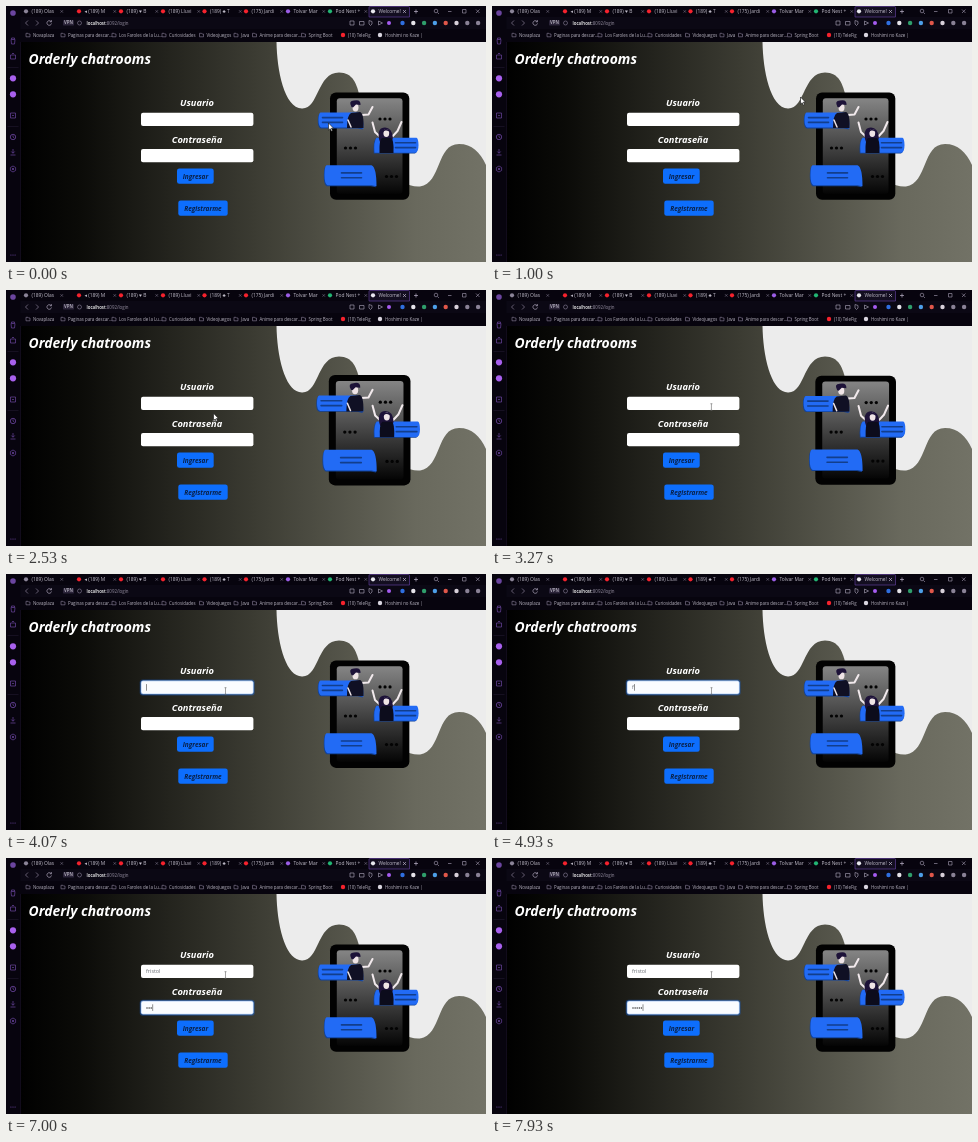
Write an HTML page that moves like this. It is 480x256 px and loops after 8000 ms.

```html
<!DOCTYPE html>
<html lang="es">
<head>
<meta charset="utf-8">
<title>Welcome!</title>
<style>
html, body { margin: 0; width: 100%; height: 100%; overflow: hidden; background: #000; }
svg { display: block; width: 100vw; height: 100vh; }
text { font-family: "Open Sans", "Noto Sans", sans-serif; white-space: pre; }
.ui { font-size: 4.9px; fill: #c4c0cd; }
.mark { font-size: 4.4px; fill: #b9b5c2; }
.head { font-weight: 700; font-style: italic; fill: #fff; }
.btn { font-weight: 700; font-style: italic; font-size: 6.5px; fill: #0a2148; }
.value { font-size: 5.4px; fill: #686c72; }
</style>
</head>
<body>
<svg viewBox="0 0 480 256" preserveAspectRatio="none">
  <defs>
    <linearGradient id="page">
      <stop offset="0" stop-color="#000"/>
      <stop offset=".13" stop-color="#0b0b08"/>
      <stop offset=".5" stop-color="#3b3b32"/>
      <stop offset=".85" stop-color="#69695d"/>
      <stop offset="1" stop-color="#727266"/>
    </linearGradient>
    <linearGradient id="screen" x2="0" y2="1">
      <stop offset="0" stop-color="#858585"/>
      <stop offset=".55" stop-color="#3e3e3e"/>
      <stop offset="1" stop-color="#050505"/>
    </linearGradient>
  </defs>

  <rect x="14" y="35" width="466" height="221" fill="url(#page)"/>
  <path fill="#ececec" d="M270.500 36C271 64 278 102 296 102.500C313 103 311 66.500 333 66.500C347 66.500 351 78 354 92C360 125 372 168 396 175C402 179 408 181 414 180.500C436 177 430 138 453 138C466 138 474 146 480 159V36Z"/>

  <path d="M0 0H480V36H14.500V256H0Z" fill="#07040e"/>
  <path d="M14.500 11H480V23H14.500Z" fill="#0b0814"/>
  <path d="M14.500 256V36" stroke="#1b142b" stroke-width=".6"/>
  <path d="M363 11V1.500Q363 .5 364 .5H402.500Q403.500 .5 403.500 1.500V11Z" fill="#130e20" stroke="#6a45a8" stroke-width=".6"/>
  <g id="side" fill="none" stroke="#6b459f" stroke-width=".8"></g>
  <g id="bar"></g>

  <text class="head" x="22.500" y="58" font-size="13.900">Orderly chatrooms</text>
  <text class="head" x="191" y="100.300" font-size="9.300" text-anchor="middle">Usuario</text>
  <text class="head" x="191" y="136.700" font-size="9.300" text-anchor="middle">Contraseña</text>
  <g id="form"></g>
  <rect x="171" y="162.500" width="36.700" height="15.200" rx="2.300" fill="#0d6efd"/>
  <text class="btn" x="189.500" y="172.500" text-anchor="middle">Ingresar</text>
  <rect x="172.300" y="194.500" width="49.400" height="15.300" rx="2.300" fill="#0d6efd"/>
  <text class="btn" x="197" y="204.600" text-anchor="middle">Registrarme</text>

  <g id="art">
    <rect x="324" y="86.600" width="79.300" height="107.200" rx="6" fill="#020202"/>
    <rect x="330.800" y="92.300" width="65.700" height="95.500" rx="3" fill="url(#screen)"/>
    <g id="bubbles"></g>
    <g stroke-linecap="round" stroke-linejoin="round">
      <path d="M356 109L362.500 108.500L366.500 101" fill="none" stroke="#f1e9ec" stroke-width="2"/>
      <path d="M341 122Q341 109 345 107L354 106Q358 107 357.500 122Z" fill="#101024"/>
      <path d="M342 114L345 121" stroke="#eee5e8" stroke-width="1.500"/>
      <ellipse cx="349.500" cy="101.500" rx="3" ry="3.900" fill="#efe4e6"/>
      <path d="M345.500 101Q342 94.500 348 94.500Q355 93 354.500 99L350 98.500L347 101.500Z" fill="#1d1238"/>
      <path d="M375.500 132L369 126L366.500 116.500M385 132L391.500 125L395.500 116" fill="none" stroke="#f1e9ec" stroke-width="2"/>
      <path d="M373 133Q371 121.500 379 121.500Q386 121.500 387 132L385 136H374Z" fill="#1d1238"/>
      <ellipse cx="380.300" cy="127" rx="2.900" ry="3.900" fill="#efe4e6"/>
      <path d="M376.500 126Q379 122 383.500 125" fill="none" stroke="#1d1238" stroke-width="1.500"/>
      <path d="M373.500 147Q373 134 376 132L385 132Q388 133 387.500 147Z" fill="#0c0c1c"/>
    </g>
  </g>

  <g id="cursor">
    <path id="arrow" d="M0 0V7.200L1.700 5.700L2.800 8.200L4 7.600L2.900 5.200H5Z" fill="#fff" stroke="#111" stroke-width=".6"/>
    <path id="beam" d="M-1 -3.300H1M0 -3.300V3.300M-1 3.300H1" fill="none" stroke="#666" stroke-width=".6"/>
  </g>
</svg>
<script>
const LOOP = 8000, PULSE = 1000;
const NS = "http://www.w3.org/2000/svg";
const $ = id => document.getElementById(id);

function add(parent, tag, attrs, text) {
  const el = document.createElementNS(NS, tag);
  for (const k in attrs) el.setAttribute(k, attrs[k]);
  if (text) el.textContent = text;
  parent.appendChild(el);
  return el;
}
const dot = (g, cx, cy, r, fill) => add(g, "circle", { cx, cy, r, fill, stroke: "none" });
const label = (g, x, y, cls, text) => add(g, "text", { x, y, class: cls }, text);
const line = (g, d, stroke, w = .7) => add(g, "path", { d, stroke, fill: "none", "stroke-width": w });

function drawTabs(g) {
  const red = "#f5222d";
  [[20, "#8b8498", "(189) Olas"], [73, red, "◂ (189) M"], [115, red, "(189) ♥ B"],
   [157, red, "(189) Lluvi"], [198.5, red, "(189) ♣ T"], [240, red, "(175) Jardi"],
   [282, "#9b5de5", "Tolvar Mar"], [324, "#22b573", "Pod Nest +"], [367, "#e8e8ee", "Welcome!"]
  ].forEach(([x, fill, name], i) => {
    dot(g, x, 5.3, 2.1, fill);
    label(g, x + 5.5, 7, "ui", name);
    if (i < 8) line(g, `M${x + 34.5} 4.200L${x + 37} 6.700M${x + 37} 4.200L${x + 34.5} 6.700`, "#8d859b", .5);
  });
  line(g, "M397 4L400 7M400 4L397 7M408 5.500H412M410 3.500V7.500", "#bcb4c9");
  line(g, "M431.500 6.500L433 8M442 5.500H445.500M456.500 3.500H460V7H456.500ZM470 3.500L473.500 7M473.500 3.500L470 7", "#aaa2b8", .6);
  add(g, "circle", { cx: 430, cy: 5, r: 1.8, fill: "none", stroke: "#aaa2b8", "stroke-width": .6 });
}

function drawAddress(g) {
  line(g, "M22 14.500L19.500 17L22 19.500M30 14.500L32.500 17L30 19.500", "#8b829a");
  line(g, "M45 15.500A2.300 2.300 0 1 0 45.500 17.500M45.500 14.200V15.800H43.800", "#b3abc0");
  add(g, "rect", { x: 57, y: 14, width: 11, height: 5.6, rx: 1.2, fill: "#2b2439" });
  label(g, 58, 18.3, "mark", "VPN").setAttribute("font-weight", 600);
  add(g, "circle", { cx: 73.5, cy: 17, r: 2, fill: "none", stroke: "#8b829a", "stroke-width": .6 });
  const url = label(g, 80.5, 18.6, "mark", "");
  add(url, "tspan", { fill: "#fff", "font-weight": 600 }, "localhost");
  add(url, "tspan", { fill: "#9992a5" }, ":8092/login");
  line(g, "M344 15H348V19H344ZM353.500 15.500H358V19H353.500ZM363 14.500L366 15.500V18L364.500 19.500L363 18ZM372.500 15L376.500 17L372.500 19Z", "#b3abc0", .6);
  dot(g, 383, 17, 2, "#a65cf0");
  ["#2f6fe0", "#e6e4ea", "#2f9e6b", "#4d9fe8", "#e0574a", "#d8d0da", "#8a8296", "#8a8296"]
    .forEach((c, i) => dot(g, 396.5 + i * 10.8, 17, 2.2, c));
}

function drawBookmarks(g) {
  [[22, "Novaplaza"], [57, "Paginas para descar..."], [108, "Los Faroles de la Lu..."],
   [158, "Curiosidades"], [195.5, "Videojuegos"], [230, "Java"],
   [248.5, "Anime para descar..."], [297.5, "Spring Boot"], [337, "(10) TeleFig", "#f5222d"],
   [374, "Hoshimi no Kaze |", "#d9d5df"]
  ].forEach(([x, name, color]) => {
    if (color) dot(g, x, 29, 2.2, color);
    else line(g, `M${x - 2} 27.300H${x}L${x + .6} 28H${x + 2}V30.800H${x - 2}Z`, "#8b829a", .6);
    label(g, x + 5, 30.6, "mark", name);
  });
}

function drawSide(g) {
  const purple = "#6b459f";
  dot(g, 7, 7, 2.8, purple);
  dot(g, 7, 72.3, 3.1, "#a860ee");
  dot(g, 7, 88.3, 3.1, "#a860ee");
  line(g, "M5 33.500H9L8.500 38H5.500ZM5.500 33V32H8.500V33", purple);
  line(g, "M4.500 49H9.500V53H4.500ZM6 47.500H8", purple);
  line(g, "M1.500 61.500H12.500M1.500 120.500H12.500", "#251c35", .5);
  line(g, "M4.500 107H9.500V112H4.500ZM6 109.500H8", purple);
  add(g, "circle", { cx: 7, cy: 131, r: 2.7 });
  line(g, "M7 129.300V131L8.300 132", purple);
  line(g, "M7 143V147M5.300 145.500L7 147.300L8.700 145.500M4.500 149H9.500", purple);
  line(g, "M7 160L9.600 161.500V164.500L7 166L4.400 164.500V161.500Z", purple);
  dot(g, 7, 163, 1, purple);
  for (let i = -1; i < 2; i++) dot(g, 7 + i * 2.1, 249, .6, purple);
}

function drawBubbles(g) {
  [[312.5, 106.5, 45, 15, 4], [368.5, 131.7, 44, 15, 21], [318.5, 159.3, 52, 20, 17]].forEach(([x, y, w, h, inset], i) => {
    const r = x + w, b = y + h;
    const d = i === 1
      ? `M${r - 2} ${y}H${x + 2}Q${x - 1} ${y + 4} ${x} ${b}H${r - 3}Q${r} ${b - 1} ${r} ${y + h / 2}Q${r} ${y + 1} ${r - 2} ${y}Z`
      : `M${x + 2} ${y}H${r - 5}Q${r} ${y + 2} ${r} ${b + 1}L${r - 5} ${b}H${x + 3}Q${x} ${b - 1} ${x} ${y + h / 2}Q${x} ${y + 1} ${x + 2} ${y}Z`;
    add(g, "path", { d, fill: "#124298", transform: "translate(-.7 .9)" });
    add(g, "path", { d, fill: "#226bf5" });
    const lx = x + inset, mid = y + h / 2;
    line(g, `M${lx} ${mid - 2.4}H${lx + 20}M${lx} ${mid + 2.4}H${lx + 20}`, "#123e8c", 1.6)
      .setAttribute("stroke-linecap", "round");
  });
  [[379, 113], [344.5, 142], [385.5, 170.5]].forEach(([x, y]) => {
    for (let i = -1; i < 2; i++) dot(g, x + i * 5, y, 1.6, "#030303");
  });
}

function makeField(y, masked) {
  const g = $("form"), step = 2.1;
  const glow = add(g, "rect", { x: 133.7, y: y - 1.3, width: 115, height: 16, rx: 3, fill: "#0d6efd", opacity: .32 });
  const box = add(g, "rect", { x: 135, y, width: 112.4, height: 13.3, rx: 2, "stroke-width": .6 });
  const text = label(g, 140, y + 8.5, "value", "");
  const mask = add(g, "g", {});
  const caret = add(g, "rect", { y: y + 3.3, width: .6, height: 6.6, fill: "#444" });
  return (value, focused, caretOn) => {
    if (masked) mask.replaceChildren(), [...value].forEach((c, i) => dot(mask, 141 + i * step, y + 6.9, .75, "#333"));
    else text.textContent = value;
    const width = masked ? value.length * step : value && text.getComputedTextLength();
    glow.style.display = focused ? "" : "none";
    box.setAttribute("fill", focused ? "#fafcff" : "#fff");
    box.setAttribute("stroke", focused ? "#7aa9ef" : "none");
    caret.setAttribute("x", 140.2 + (width || 0));
    caret.style.display = focused && caretOn ? "" : "none";
  };
}

drawTabs($("bar"));
drawAddress($("bar"));
drawBookmarks($("bar"));
drawSide($("side"));
drawBubbles($("bubbles"));
const userField = makeField(106.8), passField = makeField(143, true);

const USER = "fristol", PASS = "12345", FOCUS = 3650, TAB = 6480;
const userKeys = [4900, 5080, 5250, 5430, 5600, 5800, 6160];
const passKeys = [6660, 6810, 6950, 7220, 7600];
const route = [[0, 322.5, 117], [700, 308.5, 91], [1750, 308.5, 91], [2450, 207.5, 123.3],
               [2700, 207.5, 123.3], [3300, 219.5, 117], [LOOP, 219.5, 117]];

const ease = p => p * p * (3 - 2 * p);

function pointer(t) {
  const i = route.findIndex((p, n) => n && t <= p[0]);
  const [t0, x0, y0] = route[i - 1], [t1, x1, y1] = route[i];
  const p = ease((t - t0) / (t1 - t0));
  return [x0 + (x1 - x0) * p, y0 + (y1 - y0) * p];
}

function render(t) {
  const scale = 1.015 - .015 * Math.cos(t / PULSE * 2 * Math.PI);
  $("art").setAttribute("transform", `translate(363.600 140.200) scale(${scale}) translate(-363.600 -140.200)`);

  const typed = keys => keys.filter(k => k <= t).length;
  const last = Math.max(...[FOCUS, TAB, ...userKeys, ...passKeys].filter(k => k <= t));
  const caretOn = (t - last) % 1000 < 500;
  userField(USER.slice(0, typed(userKeys)), t >= FOCUS && t < TAB, caretOn);
  passField(PASS.slice(0, typed(passKeys)), t >= TAB, caretOn);

  const [x, y] = pointer(t);
  const overField = x > 135 && x < 247 && y > 107 && y < 120;
  $("cursor").setAttribute("transform", `translate(${x} ${y})`);
  $("arrow").style.display = overField ? "none" : "";
  $("beam").style.display = overField ? "" : "none";
}

const start = performance.now();
function tick() {
  render((performance.now() - start) % LOOP);
  requestAnimationFrame(tick);
}
tick();
</script>
</body>
</html>
```
